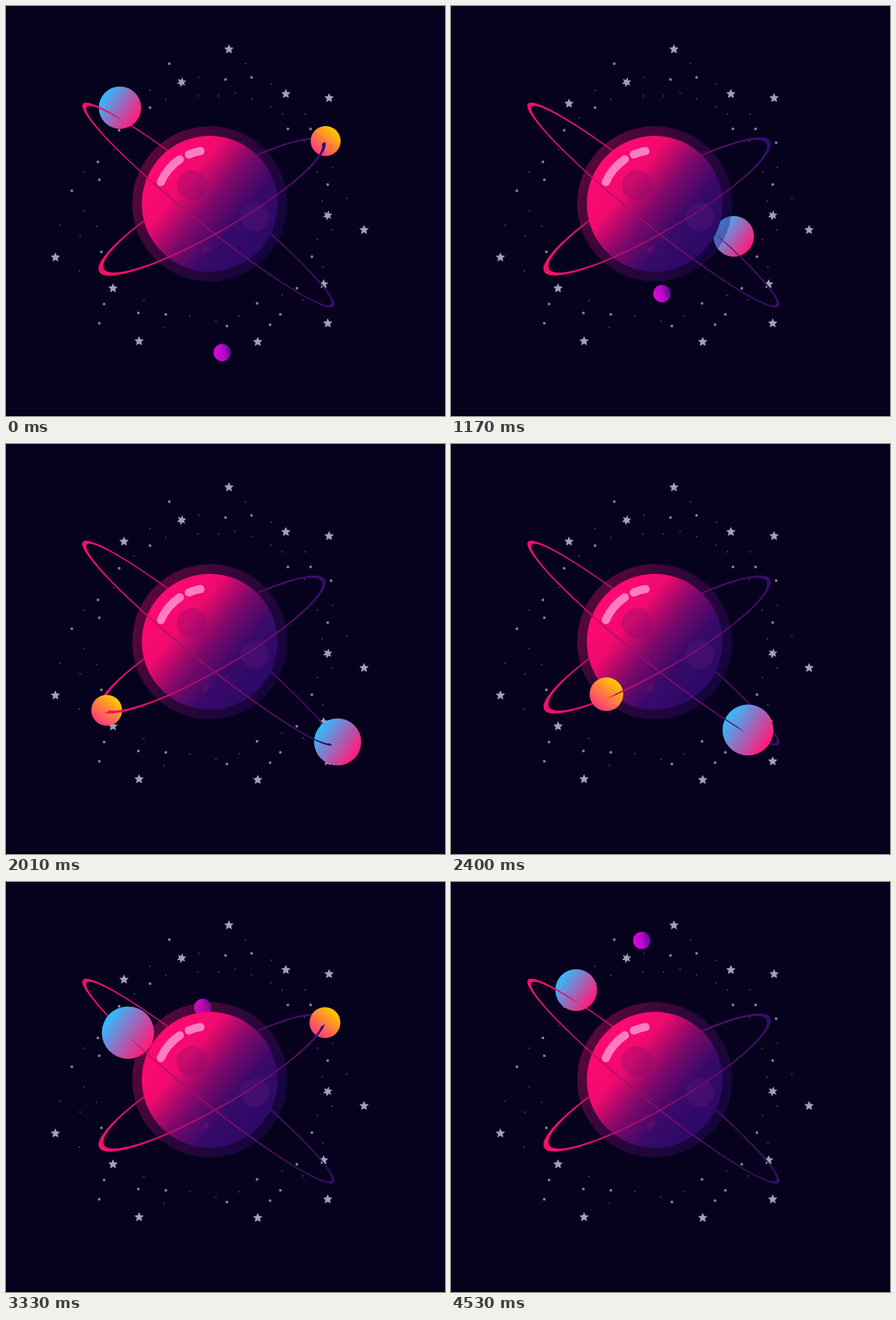
An HTML page with a canvas for the animation above (4560 ms loop, 640 by 597 pixels).

```html
<!DOCTYPE html>
<html lang="en">
<head>
<meta charset="utf-8">
<title>Planet with orbiting moons</title>
<style>
html, body { margin: 0; height: 100%; overflow: hidden; background: #06021e; }
canvas { display: block; }
</style>
</head>
<body>
<canvas id="stage" width="640" height="597"></canvas>
<script>
const ctx = document.getElementById('stage').getContext('2d');
const LOOP = 4560, STEP = 30, TAU = Math.PI * 2;
const PLANET = { x: 297, y: 288, r: 99 };
const DEPTH = 0.15; // perspective strength of the orbits

// x, y pairs
const stars = [325,63, 256,111, 469,305, 172,142, 408,128, 471,134, 522,326, 72,366, 156,411,
  463,405, 469,462, 194,488, 367,489];
const dots = [238,84, 320,107, 358,104, 210,148, 165,181, 134,227, 96,269, 136,253, 139,358, 143,434,
  136,462, 193,447, 233,449, 322,466, 366,433, 385,464, 400,449, 424,411, 446,365, 469,260, 474,199,
  411,179, 444,179];
const specks = [349,84, 281,104, 210,123, 233,136, 280,131, 310,131, 334,127, 358,135, 387,114, 386,147,
  403,157, 436,157, 187,163, 157,209, 114,242, 79,319, 114,298, 132,321, 108,335, 107,386, 201,429,
  231,468, 268,451, 306,459, 340,451, 402,421, 433,428, 462,380, 454,340, 475,326, 461,284, 497,280,
  476,235, 454,242, 435,197];

// a, b: ring half axes; moon: centre, orbit half axes, offset, radius, speed and phase
const yellow = {
  x: 300.5, y: 292, angle: -Math.PI / 6, a: 190, b: 38, thick: 7,
  moon: { x: 301.3, y: 287.5, a: 186, b: 30.6, lift: 1.7, r: 21.3, dir: 1, speed: 1.825e-3, phase: -0.17,
    colors: ['#ffc400', '#ff3c78'], light: -0.9 }
};
const blue = {
  x: 295, y: 290, angle: 0.679, a: 235, b: 28, thick: 6,
  moon: { x: 295, y: 290, a: 235, b: 33, lift: 14.2, r: 33.2, dir: -1, speed: 1.416e-3, phase: 0.523,
    colors: ['#38b6fa', '#ff1d7c'], light: 3.75 }
};
const rings = [blue, yellow];

function pairs(list, draw) {
  for (let i = 0; i < list.length; i += 2) draw(list[i], list[i + 1], i / 2);
}

function disc(x, y, r, fill) {
  ctx.fillStyle = fill;
  ctx.beginPath();
  ctx.arc(x, y, r, 0, TAU);
  ctx.fill();
}

function linear(x, y, r, angle, colors) {
  const dx = Math.cos(angle) * r, dy = Math.sin(angle) * r;
  const g = ctx.createLinearGradient(x + dx, y + dy, x - dx, y - dy);
  colors.forEach((c, i) => g.addColorStop(i / (colors.length - 1), c));
  return g;
}

function star(x, y, r, points) {
  ctx.beginPath();
  for (let i = 0; i < points * 2; i++) {
    const a = i * Math.PI / points - Math.PI / 2 + (points - 5) * 0.2;
    const d = i % 2 ? r * 0.48 : r;
    ctx.lineTo(x + Math.cos(a) * d, y + Math.sin(a) * d);
  }
  ctx.fill();
}

function drawSky() {
  ctx.fillStyle = '#06021e';
  ctx.fillRect(0, 0, 640, 597);
  ctx.fillStyle = '#000';
  ctx.fillRect(0, 595, 640, 2);
  pairs(specks, (x, y) => disc(x, y, 1, '#56526c'));
  pairs(dots, (x, y) => disc(x, y, 2, '#85809a'));
  ctx.fillStyle = '#a49fb8';
  pairs(stars, (x, y, i) => star(x, y, 7.3, i === 1 || i === 2 ? 6 : 5));
}

// Part of a ring between two heights across its short axis
function drawRing(ring, from, to) {
  const { a, b, thick } = ring;
  ctx.save();
  ctx.translate(ring.x, ring.y);
  ctx.rotate(ring.angle);
  ctx.beginPath();
  ctx.rect(-a - 5, from, 2 * a + 10, to - from);
  ctx.clip();
  ctx.fillStyle = linear(0, 0, a, Math.PI, ['#fa1068', '#350c6c']);
  ctx.beginPath();
  ctx.ellipse(0, 0, a, b, 0, 0, TAU);
  ctx.ellipse(1, 0, a - thick, b - 1.8, 0, 0, TAU);
  ctx.fill('evenodd');
  ctx.restore();
}

function locate({ angle, b, moon }, t) {
  const turn = moon.phase + moon.speed * t;
  const scale = 1 / (1 + DEPTH * Math.sin(turn));
  const depth = Math.sin(turn) * scale;
  const p = moon.dir * moon.a * Math.cos(turn) * scale;
  const q = -moon.lift - moon.b * depth;
  const cos = Math.cos(angle), sin = Math.sin(angle);
  return {
    x: moon.x + p * cos - q * sin,
    y: moon.y + p * sin + q * cos,
    r: moon.r * scale,
    behind: depth > 0,
    cut: -b * (depth + 0.153) / 1.023 // ring beyond this height is nearer than the moon
  };
}

function drawMoon(ring, pos) {
  const { colors, light } = ring.moon;
  disc(pos.x, pos.y, pos.r, linear(pos.x, pos.y, pos.r * 0.9, light, colors));
  drawRing(ring, pos.cut, pos.behind ? 0 : 60);
}

function drawPurple(t) {
  const y = 290 + 235 * Math.cos(0.42 + 4.88e-4 * t);
  const x = 278 + (y - 84) * 0.0883;
  disc(x, y, 12.6, linear(x, y, 12.6, 2.9, ['#dc08dc', '#c008cc', '#5c0a96']));
}

function drawPlanet() {
  const { x, y, r } = PLANET;
  ctx.globalAlpha = 0.38;
  disc(x, y, 113, linear(x, y, 105, 3.7, ['#d81068', '#6a0c68', '#2e0a70']));
  ctx.globalAlpha = 1;
  disc(x, y, r, linear(x, y, r * 0.92, 3.83, ['#ff0a70', '#f00a6e', '#80096a', '#380a6a', '#2d0968']));
  disc(271, 261, 22, 'rgba(120,16,104,.3)');
  disc(363, 307, 21, 'rgba(110,30,130,.25)');
  ctx.fillStyle = 'rgba(150,16,110,.3)';
  ctx.beginPath();
  ctx.ellipse(259, 330, 9, 6, -0.8, 0, TAU);
  ctx.ellipse(291, 355, 7, 4, -0.8, 0, TAU);
  ctx.fill();
  ctx.strokeStyle = '#ff7cc4';
  ctx.lineWidth = 12;
  ctx.lineCap = 'round';
  for (const [from, to] of [[204, 236], [247, 260]]) {
    ctx.beginPath();
    ctx.arc(x, y, 78, from * TAU / 360, to * TAU / 360);
    ctx.stroke();
  }
}

function render(t) {
  const moons = [yellow, blue].map(ring => [ring, locate(ring, t)]);
  drawSky();
  drawPurple(t);
  rings.forEach(ring => drawRing(ring, -60, 0));
  moons.forEach(([ring, pos]) => pos.behind && drawMoon(ring, pos));
  drawPlanet();
  rings.forEach(ring => drawRing(ring, 0, 60));
  moons.forEach(([ring, pos]) => pos.behind || drawMoon(ring, pos));
}

const start = performance.now();
function tick() {
  const t = (performance.now() - start) % LOOP;
  render(Math.floor(t / STEP) * STEP);
  requestAnimationFrame(tick);
}
tick();
</script>
</body>
</html>
```
